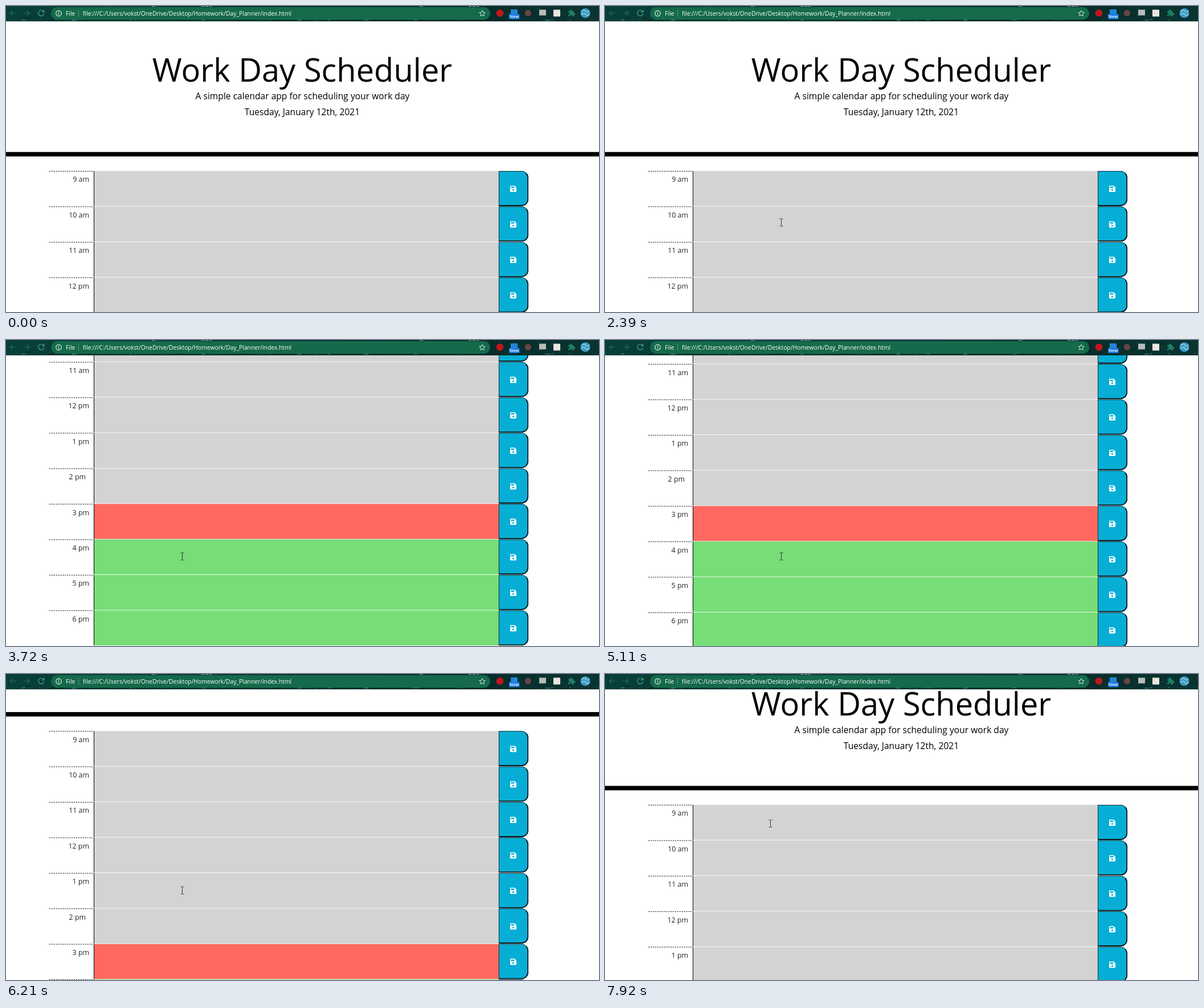
Animation, 1041 px wide and 538 px high, one loop 8 s. Source, as an HTML page:

```html
<!DOCTYPE html>
<html lang="en">
<head>
<meta charset="utf-8">
<title>Work Day Scheduler</title>
<style>
  html, body { margin: 0; width: 100%; height: 100%; overflow: hidden; background: #fff; }
  svg { display: block; width: 100%; height: 100%; font-family: "Open Sans", "Noto Sans", sans-serif; }
</style>
</head>
<body>
<svg id="stage" viewBox="0 0 1041 538">
  <defs>
    <linearGradient id="theme">
      <stop offset="0" stop-color="#083f39"/>
      <stop offset=".3" stop-color="#0a3835"/>
      <stop offset=".8" stop-color="#072d2a"/>
      <stop offset="1" stop-color="#093432"/>
    </linearGradient>
    <g id="save">
      <path d="M865 0H905.300A11.700 11.700 0 0 1 917 11.700V49.900A11.700 11.700 0 0 1 905.300 61.600H865Z" fill="#06aed5"/>
      <path d="M865.400 61V.400H905.300A11.300 11.300 0 0 1 913.500 4" fill="none" stroke="#222" stroke-width=".9"/>
      <path d="M865 60.800H905.300A10.900 10.900 0 0 0 916.200 49.900V11.700A10.900 10.900 0 0 0 913 4" fill="none" stroke="#000" stroke-width="1.560"/>
      <path d="M886 25.900H893L896 28.900V35.900Q896 36.900 895 36.900H886Q885 36.900 885 35.900V26.900Q885 25.900 886 25.900Z" fill="#fff"/>
      <path d="M886.400 27.400H892.400V30H886.400Z" fill="#06aed5"/>
      <circle cx="890.400" cy="33.500" r="1.600" fill="#06aed5"/>
    </g>
  </defs>
  <rect width="1041" height="538" fill="#fff"/>
  <g id="head" text-anchor="middle" fill="#000">
    <text x="520" y="133" font-size="56">Work Day Scheduler</text>
    <text x="520.500" y="164" font-size="15.600">A simple calendar app for scheduling your work day</text>
    <text x="520" y="192" font-size="15.600">Tuesday, January 12th, 2021</text>
  </g>
  <rect id="bar" width="1041" height="7.800"/>
  <g id="rows" font-size="12.400" fill="#212529" text-anchor="end"></g>

  <g id="toolbar">
    <rect width="1041" height="27" fill="url(#theme)"/>
    <g id="leaves"></g>
    <path d="M256 .5h8M343 .5h18M726 .5h8M812 .5h18" stroke="#9fb5ae" stroke-dasharray="5 2"/>
    <rect x="79" y="2" width="771" height="22" rx="11" fill="#146a4a"/>
    <g fill="none" stroke="#1d665a" stroke-width="1.400">
      <path d="M17.500 12.500H7.500M12 8L7.500 12.500 12 17M31.500 12.500h10M37 8l4.500 4.500L37 17"/>
      <path d="M66 9.500A5 5 0 1 0 66.800 13.500M66.800 7v3.500h-3.500" stroke="#3f9c80"/>
    </g>
    <circle cx="92.500" cy="13" r="4.800" fill="none" stroke="#e4f1ec" stroke-width="1.200"/>
    <path d="M92.500 10v1.400M92.500 12.300v3.500" stroke="#e4f1ec" stroke-width="1.200"/>
    <path d="M127.500 7v12" stroke="#5c9a83"/>
    <g fill="#fff" font-size="10.300">
      <text x="105" y="16.500">File</text>
      <text x="135" y="16.500">file:///C:/Users/vokst/OneDrive/Desktop/Homework/Day_Planner/index.html</text>
    </g>
    <path d="M836 7.800l1.500 3.400 3.700.3-2.800 2.500.8 3.600-3.200-1.900-3.200 1.900.8-3.600-2.800-2.500 3.700-.3z" fill="none" stroke="#d5e8e0"/>
    <circle cx="867" cy="12.500" r="6.300" fill="#c2161d"/>
    <rect x="886" y="6" width="12" height="9" fill="#2585d8"/>
    <rect x="883" y="14" width="18.500" height="9" rx="1.500" fill="#1877e6"/>
    <text x="892.200" y="21.300" font-size="7.600" font-weight="600" text-anchor="middle" fill="#fff">New</text>
    <circle cx="916.500" cy="12.500" r="5.500" fill="#6a4443"/>
    <rect x="936" y="6.500" width="12" height="10" fill="#b7bcb9"/>
    <rect x="961" y="6.500" width="12" height="12" fill="#e9e6df"/>
    <path d="M987 9h3a2 2 0 1 1 3.600 0h3v3.300a2 2 0 1 1 0 3.600V18h-3.300a1.800 1.800 0 1 0-3.500 0H987v-3a1.800 1.800 0 1 0 0-3.400z" fill="#1f8066"/>
    <circle cx="1017" cy="12.500" r="8.500" fill="#3d9bc4"/>
    <path d="M1010 10q4-5 8-1t6-1M1010 15q5-4 8 0t6-1" fill="none" stroke="#8fd0e6" stroke-width="1.500"/>
  </g>

  <path id="arrow" d="M.5 .5V13.500L3.400 10.800 5.200 15 7.200 14.200 5.400 10H9.300Z" fill="#fff" stroke="#000" stroke-width=".8"/>
  <path id="beam" d="M-3 -6.500H-1L0 -5.500 1 -6.500H3M0 -5.500V5.500M-3 6.500H-1L0 5.500 1 6.500H3" fill="none" stroke="#333"/>
</svg>
<script>
const $ = id => document.getElementById(id);
const LOOP = 8000, ROW_TOP = 290.1, ROW_STEP = 62.4, BAR_TOP = 256.7;
const labels = ["9 am", "10 am", "11 am", "12 pm", "1 pm", "2 pm", "3 pm", "4 pm", "5 pm", "6 pm"];
const rowColor = i => i < 6 ? "#d3d3d3" : i === 6 ? "#ff6961" : "#77dd77";

$("rows").innerHTML = labels.map((label, i) => `<g>
  <path d="M76 .4H154" stroke="#000" stroke-width=".9" stroke-dasharray="2.34 1.56"/>
  <rect x="155" width="710" height="61.6" fill="${rowColor(i)}"/>
  <path d="M154.5 0V61.6" stroke="#000"/>
  <text x="${label === "2 pm" ? 140 : 146}" y="19.4">${label}</text>
  <use href="#save"/></g>`).join("");
const rows = [...$("rows").children];

// Dim foliage behind the toolbar, with a few bright flecks along its lower edge
let seed = 7;
const rnd = () => (seed = seed * 16807 % 2147483647) / 2147483647;
const tones = ["#0d4b44", "#062522", "#11574f", "#04201e"];
$("leaves").innerHTML = Array.from({ length: 150 }, (_, i) => {
  const low = rnd() < .6, x = rnd() * 1041, y = low ? 23 + rnd() * 3 : rnd() * 24;
  const fill = low && i % 6 === 0 ? "#5f9a92" : tones[rnd() * 4 | 0];
  return `<ellipse cx="${x.toFixed(1)}" cy="${y.toFixed(1)}" rx="${(1 + rnd() * 4).toFixed(1)}" ry="1" fill="${fill}" opacity=".6"/>`;
}).join("");

const linear = p => p;
const smooth = p => p * p * (3 - 2 * p);
const out = power => p => 1 - (1 - p) ** power;

// Each move: first step, last step, number of steps, easing, path
const scrolls = [
  [2540, 2860, 5, out(1.62), [[0], [105]]],
  [3110, 3250, 3, linear, [[105], [359.5]]],
  [3720, 3720, 1, linear, [[359.5], [376.3]]],
  [5110, 5750, 9, smooth, [[376.3], [271]]],
  [6050, 6370, 5, out(1.62), [[271], [166]]],
  [6600, 7210, 9, out(3), [[166], [60]]]
];
const pointer = [
  [210, 440, 4, linear, [[1082, 593], [670, 241]]],
  [760, 1530, 11, linear, [[670, 241], [500, 152], [384, 152], [450, 145], [541, 171]]],
  [1600, 1840, 4, linear, [[541, 171], [307, 199]]],
  [2220, 2390, 3, linear, [[307, 199], [304, 260], [309.5, 380.5]]],
  [7450, 7920, 7, smooth, [[309.5, 380.5], [290.5, 263]]]
];

function along(path, p) {
  const u = p * (path.length - 1), i = Math.min(path.length - 2, Math.floor(u));
  return path[i].map((v, d) => v + (path[i + 1][d] - v) * (u - i));
}

function at(moves, t) {
  const move = moves.filter(m => t >= m[0]).pop();
  if (!move) return null;
  const [start, end, count, ease, path] = move;
  const step = count > 1 ? Math.floor((t - start) / (end - start) * (count - 1) + 1e-6) : 0;
  return along(path, ease(Math.min(count, step + 1) / count));
}

function overText(x, y, scroll) {
  const py = y + scroll, inside = (l, r, t, b) => x > l && x < r && py > t && py < b;
  return inside(155, 865, 290, 915) || inside(257, 783, 80, 146) ||
    inside(333, 708, 149, 169) || inside(418, 622, 177, 197);
}

function place(el, x, y) { el.setAttribute("transform", `translate(${x} ${y})`); }

function render(t) {
  const [scroll] = at(scrolls, t) || [0];
  place($("head"), 0, -scroll);
  place($("bar"), 0, BAR_TOP - scroll);
  rows.forEach((row, i) => place(row, 0, ROW_TOP + ROW_STEP * i - scroll));

  const pos = at(pointer, t);
  const beam = pos && overText(...pos, scroll);
  $("arrow").style.display = pos && !beam ? "" : "none";
  $("beam").style.display = beam ? "" : "none";
  if (pos) place(beam ? $("beam") : $("arrow"), ...pos);
}

const begin = performance.now();
function tick() {
  render((performance.now() - begin) % LOOP);
  requestAnimationFrame(tick);
}
tick();
</script>
</body>
</html>
```
